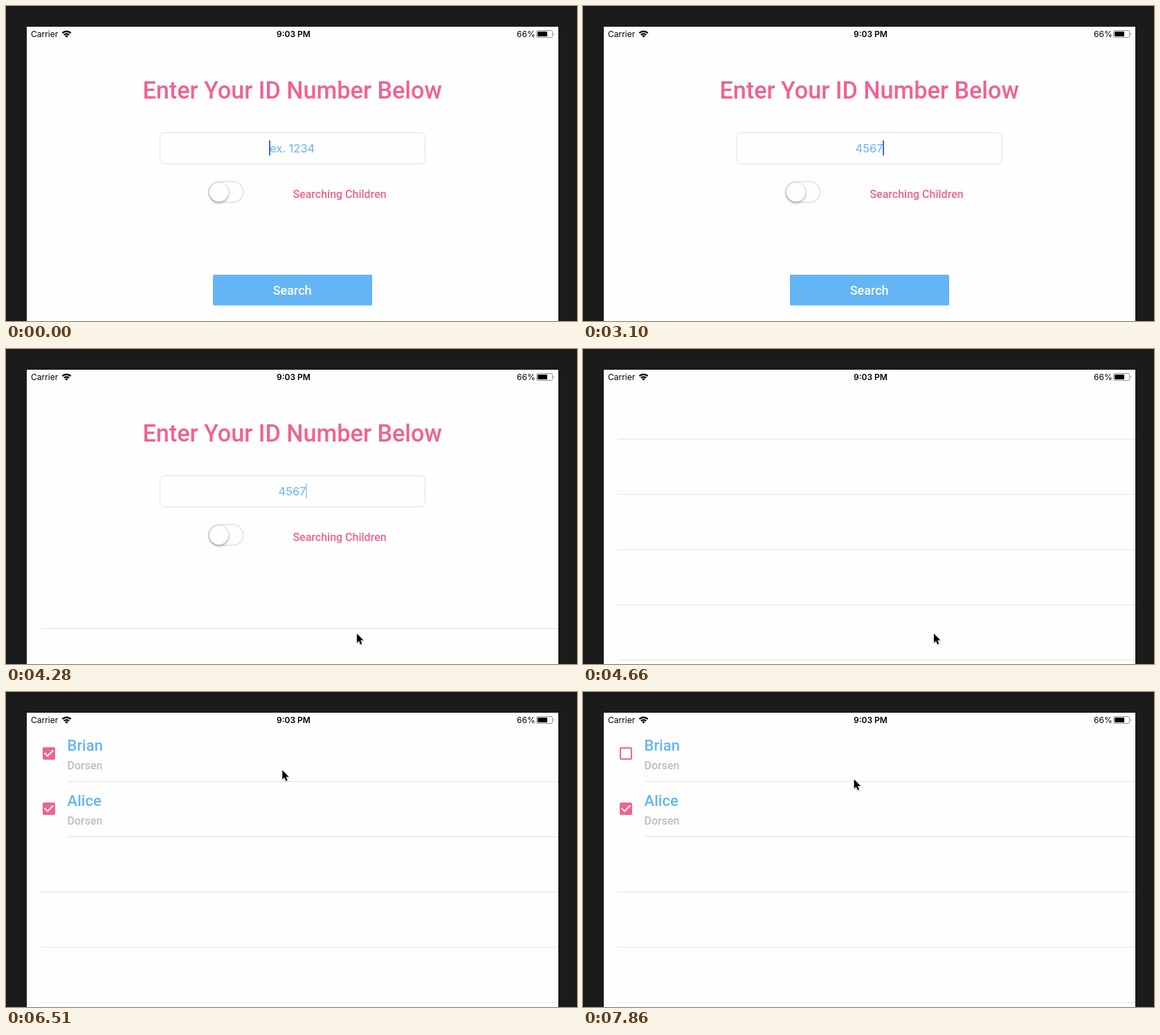
An HTML page for the animation above (8 s loop, 825 px wide and 456 px high).

```html
<!DOCTYPE html>
<html lang="en">
<head>
<meta charset="utf-8">
<title>ID lookup</title>
<style>
  html, body { margin: 0; width: 100%; height: 100%; overflow: hidden; background: #1b1b1b; }
  svg { display: block; width: 100vw; height: 100vh; }
  text { font: 500 16px Roboto, sans-serif; }
  .mid { text-anchor: middle; }
  .pink { fill: #f06292; }
  .blue { fill: #64b5f6; }
  .title { font-size: 34.2px; }
  .button { font-size: 18px; fill: #fefefe; }
  .field { font: 400 16.5px Inter, sans-serif; }
  .status { font: 400 12px Inter, sans-serif; }
  .clock { font-weight: 600; }
  .name { font-size: 22px; }
  .surname { fill: #bdbdbd; }
  .knob { filter: drop-shadow(0 2.5px 1.5px rgba(0, 0, 0, .25)); }
  .mouse { filter: drop-shadow(0 1px 1px rgba(0, 0, 0, .3)); }
</style>
</head>
<body>
<svg viewBox="0 0 825 456">
  <defs>
    <clipPath id="screenClip"><rect x="30" y="30" width="768" height="426"/></clipPath>
    <clipPath id="buttonClip"><rect x="299" y="389" width="230" height="44.5" rx="2"/></clipPath>
  </defs>
  <rect width="825" height="456" fill="#1b1b1b"/>
  <g clip-path="url(#screenClip)">
    <rect x="30" y="30" width="768" height="426" fill="#fefefe"/>

    <text class="title pink mid" x="413.7" y="134">Enter Your ID Number Below</text>
    <rect x="222.5" y="183.5" width="383" height="45" rx="6" fill="none" stroke="#e0e0e0"/>
    <text id="field" class="field blue mid" x="413.6" y="212"></text>
    <rect id="caret" y="194.5" width="2" height="22" fill="#4169e1"/>

    <rect x="292.75" y="254.25" width="50" height="30" rx="15" fill="#fefefe" stroke="#e0e0e0" stroke-width="1.5"/>
    <circle class="knob" cx="307.7" cy="269.3" r="14.2" fill="#fefefe" stroke="#cacaca" stroke-width=".8"/>
    <text class="pink mid" x="482" y="277.5">Searching Children</text>

    <g clip-path="url(#buttonClip)">
      <rect class="blue" x="299" y="389" width="230" height="45"/>
      <circle id="ripple" cx="507" cy="411" r="114" fill="#000" opacity=".15"/>
    </g>
    <text class="button mid" x="413.7" y="418">Search</text>

    <g id="sheet">
      <rect x="30" y="30" width="768" height="1024" fill="#fefefe"/>
      <rect id="highlight" x="30" y="50" width="768" height="80" fill="#d7d7d7"/>
      <g id="lines" fill="#000" fill-opacity=".11"></g>
      <g id="people"></g>
    </g>

    <text class="status" x="36" y="44.5">Carrier</text>
    <g fill="none" stroke="#000" stroke-width="2.3">
      <path d="M81.4 39.2A8.8 8.8 0 0 1 93.6 39.2M83.8 41.9A5.2 5.2 0 0 1 91.2 41.9"/>
      <path d="M85.3 43.5A3 3 0 0 1 89.7 43.5L87.5 45.7Z" fill="#000" stroke="none"/>
    </g>
    <text class="status clock mid" x="415.5" y="44.5">9:03 PM</text>
    <text class="status" x="738" y="44.5">66%</text>
    <rect x="766.5" y="35.5" width="23" height="10" rx="2" fill="none" stroke="#8c8c8c"/>
    <rect x="768" y="37" width="14" height="7"/>
    <path d="M791 38.5Q793 40.5 791 42.5Z" fill="#8c8c8c"/>

    <path id="mouse" class="mouse" d="M0 0V13.2L3 10.4 5.2 15.6 7.3 14.7 5.2 9.6H9.4Z"
      stroke="#fff" paint-order="stroke"/>
  </g>
</svg>
<script>
const LOOP = 8000;
const $ = id => document.getElementById(id);
const show = (id, on) => $(id).setAttribute('visibility', on ? 'visible' : 'hidden');
const clamp = v => Math.min(1, Math.max(0, v));
const smooth = p => p * p * (3 - 2 * p);

const DIGITS = '4567';
const keyTimes = [1550, 1850, 2300, 3100];
const IDLE = 3890, SLIDE = 4280, LOADED = 4770, PRESS = 6630, RELEASE = 6990;

const mouseStart = { x: 546, y: 460 };
const mouseMoves = [
  { first: 3280, last: IDLE, steps: 10, x: 507, y: 412 },
  { first: 5460, last: 5800, steps: 7, x: 437, y: 219.5 },
  { first: 5980, last: PRESS, steps: 11, x: 395.7, y: 103 },
  { first: 7860, last: 7860, steps: 1, x: 391.7, y: 126.5 }
];

// Eased progress of a move that is already one step along at its first refresh
function progress({ first, last, steps }, t) {
  const interval = (last - first) / (steps - 1) || 1;
  return smooth(clamp((Math.floor((t - first) / interval + 0.001) + 1) / steps));
}

function mouseAt(t) {
  return mouseMoves.reduce((pos, move) => {
    const p = progress(move, t);
    return { x: pos.x + (move.x - pos.x) * p, y: pos.y + (move.y - pos.y) * p };
  }, mouseStart);
}

// The caret blinks while waiting, stays solid while typing, then dims
function caretOpacity(t) {
  if (t >= keyTimes[0]) return t < IDLE ? 1 : 0.33;
  const period = 1040, middle = 835;
  const phase = (t - middle + 1.5 * period) % period;
  return clamp((385 - Math.abs(phase - period / 2)) / 130);
}

// Critically damped spring from the bottom of a 1024 px screen
function sheetOffset(t) {
  if (t < SLIDE) return 1024;
  const interval = 115;
  const elapsed = 140 + Math.floor((t - SLIDE) / interval) * interval;
  const x = 0.0185 * elapsed;
  return Math.floor(1024 * Math.exp(-x) * (1 + x));
}

const personRow = ([name, surname], i) => `
  <g transform="translate(0 ${i * 80})">
    <g transform="translate(50 77)">
      <rect id="box${i}" x="4" y="4" width="16" height="16" rx="1" fill="#f06292" stroke="#f06292" stroke-width="2"/>
      <path id="check${i}" d="M5.7 11.3 10 15.6 18.3 7.3" fill="none" stroke="#fefefe" stroke-width="2"/>
    </g>
    <text class="name blue" x="88.5" y="84.5">${name}</text>
    <text class="surname" x="88.5" y="112">${surname}</text>
  </g>`;
const people = [['Brian', 'Dorsen'], ['Alice', 'Dorsen']];
$('people').innerHTML = people.map(personRow).join('');
$('lines').innerHTML = Array.from({ length: 5 }, (_, i) =>
  `<rect x="50" y="${129 + i * 80}" width="748" height="1"/>`).join('');
const personLines = [...$('lines').children].slice(0, people.length);

function draw(t) {
  const typed = keyTimes.filter(at => at <= t).length;
  $('field').textContent = DIGITS.slice(0, typed) || 'ex. 1234';
  $('caret').setAttribute('x', typed ? Math.round(414.2 + 4.8 * typed) : 380);
  $('caret').setAttribute('opacity', caretOpacity(t));

  show('ripple', t >= 4070);
  $('sheet').setAttribute('transform', `translate(0 ${sheetOffset(t)})`);

  const loaded = t >= LOADED;
  show('people', loaded);
  personLines.forEach(line => line.setAttribute('x', loaded ? 89 : 50));

  const checked = t < RELEASE;
  const pressed = t >= PRESS && checked;
  show('highlight', pressed);
  $('box0').setAttribute('fill', checked ? '#f06292' : 'none');
  $('check0').setAttribute('stroke', !checked ? 'none' : pressed ? '#d7d7d7' : '#fefefe');

  const { x, y } = mouseAt(t);
  $('mouse').setAttribute('transform', `translate(${x} ${y})`);
}

function frame() {
  draw(performance.now() % LOOP);
  requestAnimationFrame(frame);
}
frame();
</script>
</body>
</html>
```
